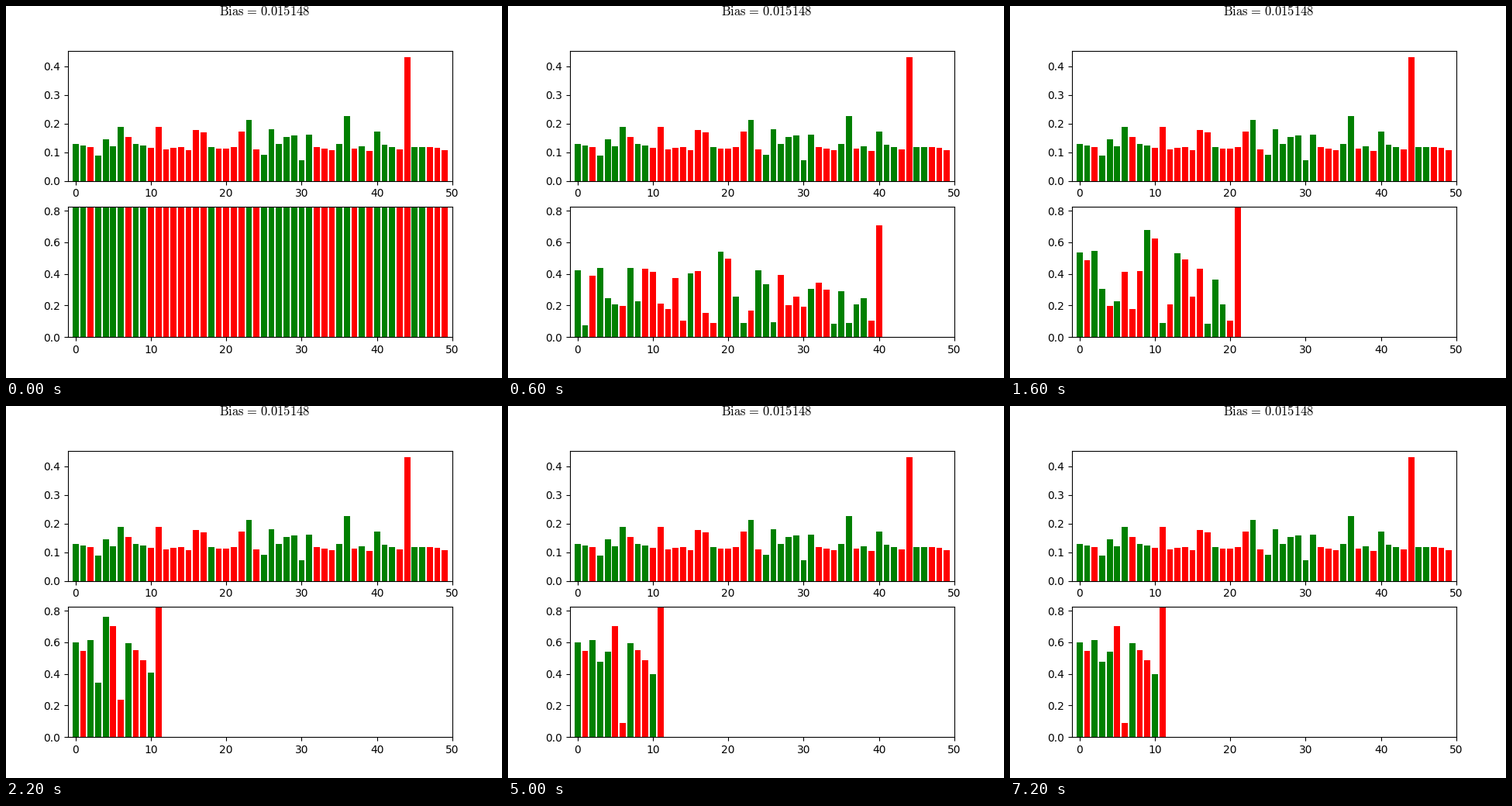
These frames come from a looping animation (640 by 480 pixels, 8 s). A matplotlib script:

```python
import numpy as np
import matplotlib.pyplot as plt
from matplotlib.animation import FuncAnimation

plt.rcParams["mathtext.fontset"] = "cm"

FRAMES, STEP_MS = 40, 200
SIZE, PRUNED = 50, 11
rng = np.random.default_rng(4)
index = np.arange(SIZE)

# Red runs (first, last); every other bar is green.
sign = np.ones(SIZE)
for first, last in ((2, 2), (7, 7), (10, 17), (19, 22), (24, 24), (32, 34),
                    (37, 37), (39, 39), (43, 44), (47, 49)):
    sign[first:last + 1] = -1

# Most scores lie near one level; a few stand out.
scores = .116 + .006 * sign + rng.uniform(-.008, .008, SIZE)
peaks = {3: .089, 4: .146, 6: .187, 7: .154, 11: .187, 16: .176, 17: .170,
         22: .173, 23: .213, 25: .092, 26: .181, 28: .154, 29: .159,
         30: .073, 31: .162, 36: .227, 40: .173, 44: .4324}
for i, height in peaks.items():
    scores[i] = height

# The features that outlast the pruning, with their weights just after it.
kept = {0: .60, 2: -.545, 3: .615, 4: .345, 23: .76, 24: -.703, 27: -.235,
        28: .595, 31: -.553, 36: -.488, 39: .41, 44: -1}
settled = {4: .475, 23: .543, 27: -.09, 39: .397}

# Order of removal: the tail first, then spread over the whole range.
lifetime = index * np.sqrt(2) % 1 + .14 * (index > 22)
lifetime[45:] = -1
lifetime[list(kept)] = 2
removal = np.argsort(lifetime)

start = sign * rng.uniform(.06, .45, SIZE)


def alive(step):
    n = round(np.interp(step, (0, 3, 5, 6, 8, PRUNED), (50, 41, 34, 26, 22, 12)))
    return np.sort(removal[SIZE - n:])


def weights(step):
    """Signed weights of the remaining features, in order."""
    if step == 0:
        return sign
    w = start.copy()
    growth = np.interp(step, (0, PRUNED), (.6, 1))
    gap = np.exp(-(max(step - PRUNED, 0) / 3.87) ** 1.475)
    for i, value in kept.items():
        end = settled.get(i, value)
        w[i] = growth * (end + (value - end) * gap)
    return w[alive(step)]


def color(value):
    return "red" if value < 0 else "green"


fig, (top, low) = plt.subplots(2, 1, figsize=(6.4, 4.8), dpi=100)
fig.text(274.6 / 640, 1 - 12.5 / 480,
         r"$\mathrm{Bias}\hspace{0.13}=\hspace{0.13}\mathrm{0.015148}$",
         fontsize=11.9, ha="left", va="baseline")

hues = [color(s) for s in sign]
top.bar(index, scores, color=hues)
bars = low.bar(index, np.ones(SIZE), color=hues)
for ax, limit in ((top, .454), (low, .8245)):
    ax.set_xlim(-1, SIZE)
    ax.set_ylim(0, limit)


def draw(step):
    values = weights(step)
    for i, bar in enumerate(bars):
        bar.set_visible(i < len(values))
    for bar, value in zip(bars, values):
        bar.set_height(abs(value))
        bar.set_facecolor(color(value))
    return list(bars)


anim = FuncAnimation(fig, draw, frames=FRAMES, interval=STEP_MS,
                     init_func=lambda: draw(0), repeat=True, repeat_delay=0)
plt.show()
```
